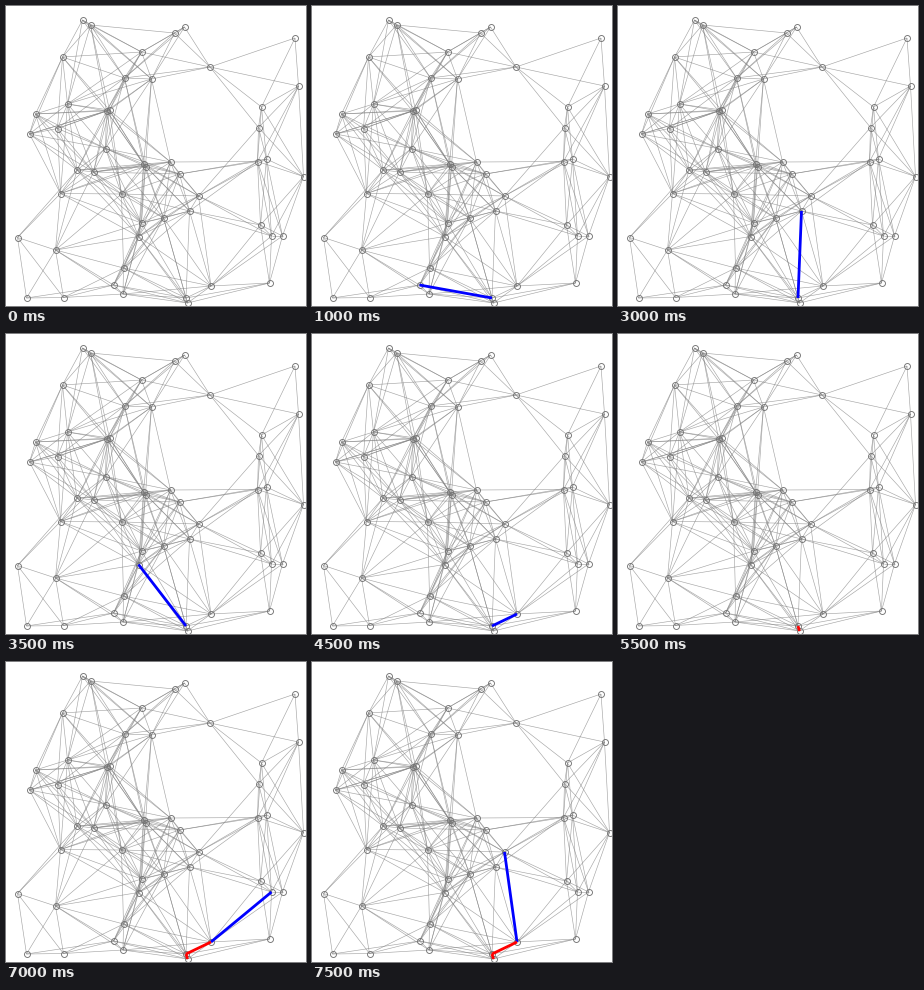
A matplotlib script that plays this animation: 300x300 px, repeating every 8 s.

```python
from math import dist, inf

import matplotlib.pyplot as plt
from matplotlib.animation import FuncAnimation
from matplotlib.collections import LineCollection

SIZE, DPI = 300, 100
RADIUS = 91.2  # nodes closer than this are linked
FRAMES, INTERVAL = 16, 500

# Node positions in pixels; the search starts at the first one.
NODES = [
    (180.5, 292), (182, 297), (108, 279), (117.5, 288), (136, 217),
    (118, 262), (184, 205), (133, 230.5), (158, 212), (205.5, 280),
    (264, 277), (255, 219), (266, 230), (193, 190), (277, 230),
    (77, 14), (85, 19), (179, 21), (169, 27), (289.5, 32),
    (136, 46), (57, 51), (204.5, 61), (119, 72), (146, 73),
    (293, 80), (62, 98), (256, 101), (101, 105), (104, 104),
    (30, 108), (52, 122.5), (253, 121.5), (24, 128), (100, 142.5),
    (261, 153), (252, 155.5), (165, 156), (138, 158), (140, 160.5),
    (71.5, 164), (88, 166), (174, 168), (298, 170.5), (55, 187.5),
    (116, 188), (12, 231.5), (50, 244), (21, 292), (58, 291.5),
]


def find_edges():
    return [(a, b) for a in range(len(NODES)) for b in range(a)
            if dist(NODES[a], NODES[b]) < RADIUS]


def segments(pairs):
    return [[NODES[a], NODES[b]] for a, b in pairs]


def dijkstra(edges, start=0):
    """Yield (tree, probe) edge lists for every step of the search."""
    links = {n: sorted([a for a, b in edges if b == n]
                       + [b for a, b in edges if a == n])
             for n in range(len(NODES))}
    cost, parent = {start: 0}, {}
    queue, tree = {start}, []
    while queue:
        node = min(queue, key=cost.get)
        queue.remove(node)
        if node in parent:
            tree = tree + [(parent[node], node)]
        yield tree, []
        for other in links[node]:
            total = cost[node] + dist(NODES[node], NODES[other])
            if total < cost.get(other, inf):
                cost[other], parent[other] = total, node
                queue.add(other)
                yield tree, [(node, other)]


def add_lines(pairs, color, width, **style):
    lines = LineCollection(segments(pairs), colors=color, linewidths=width,
                           capstyle="butt", **style)
    return ax.add_collection(lines)


edges = find_edges()
steps = list(dijkstra(edges))

fig = plt.figure(figsize=(SIZE / DPI, SIZE / DPI), dpi=DPI, facecolor="white")
ax = fig.add_axes([0, 0, 1, 1])
ax.set_xlim(0.5, SIZE + 0.5)
ax.set_ylim(SIZE, 0)
ax.axis("off")

add_lines(edges, "gray", 0.45, alpha=0.7, zorder=1)
ax.plot(*zip(*NODES), "o", ms=4.3, mfc="none", mec="0.45", mew=0.65,
        snap=False, zorder=2)
probe_lines = add_lines([], "blue", 2, zorder=3)
tree_lines = add_lines([], "red", 2, zorder=4)


def update(i):
    tree, probe = steps[i]
    tree_lines.set_segments(segments(tree))
    probe_lines.set_segments(segments(probe))
    return probe_lines, tree_lines


anim = FuncAnimation(fig, update, frames=FRAMES, interval=INTERVAL,
                     repeat=True, repeat_delay=0)
plt.show()
```
